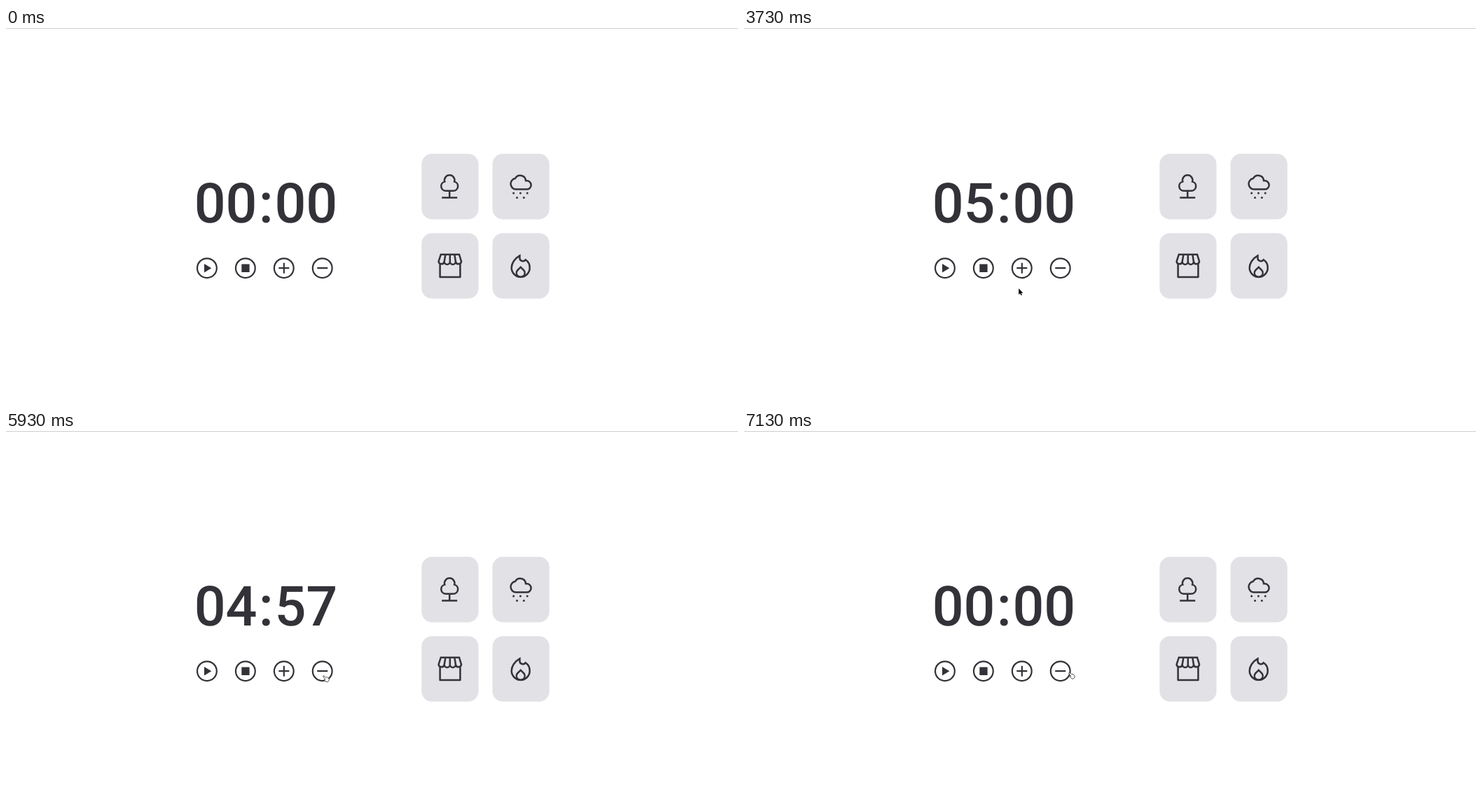
Write an HTML page that moves like this. It is 1045 px wide and 536 px high and loops after 8 s.

```html
<!DOCTYPE html>
<html lang="pt">
<head>
<meta charset="utf-8">
<title>Timer</title>
<style>
  html, body { margin: 0; width: 100%; height: 100%; overflow: hidden; background: #fff; }
  svg { display: block; text-rendering: geometricPrecision; }
  .clock { font: 500 79px Roboto, sans-serif; text-anchor: middle; fill: #323238; }
  .line { fill: none; stroke: #323238; stroke-width: 2.5; }
  .ring { fill: none; stroke: #323238; stroke-width: 2.2; }
  .ink { fill: #323238; }
  .card { fill: #e1e1e6; }
  #dialog text { font: 9.15px "DejaVu Sans Mono", monospace; fill: #15141a; }
  #dialog .bold { font-weight: 700; }
  #dialog .mid { text-anchor: middle; }
</style>
</head>
<body>
<svg width="1045" height="536" viewBox="0 0 1045 536">
  <g class="clock">
    <text id="min" x="313.6" y="278"></text>
    <text x="371.2" y="278">:</text>
    <text id="sec" x="428.3" y="278"></text>
  </g>

  <g id="rings"></g>
  <path class="ink" d="M283 337l10.3 6.2-10.3 6.2zM336.3 337.6h11.3v11.3h-11.3z"/>
  <path class="ring" d="M389.3 343.2h15M396.8 335.7v15M444.2 343.2h15"/>

  <g id="cards"></g>
  <g class="line">
    <!-- tree -->
    <path d="M638.4 232.8H628A6.7 6.7 0 0 1 626.3 219.6A7.2 7.2 0 1 1 640.1 219.6A6.7 6.7 0 0 1 638.4 232.8zM633.2 233v9.5M622.2 242.5h22"/>
    <!-- cloud -->
    <path d="M727.4 230.6H743.4a6.2 6.2 0 0 0 0-12.4H742A8 8 0 0 0 727 215A7.9 7.9 0 0 0 727.4 230.6z"/>
    <!-- shop -->
    <path d="M620.8 323.7h26.2l3 10a4.1 4.3 0 0 1-8.1 0a4.05 4.3 0 0 1-8.1 0a4.05 4.3 0 0 1-8.1 0a4.1 4.3 0 0 1-8.1 0zM627.4 323.7l-1.7 10M633.8 323.7v10M640.3 323.7l1.6 10"/>
    <path d="M619.6 337.5v18.6h28.8v-18.6" stroke-linejoin="round"/>
    <!-- flame -->
    <path d="M733.4 325.3C726 329.5 721.7 336.5 721.7 342.8A13 13 0 0 0 747.7 342.8C747.7 337.5 745 333.3 741.7 331.2C739.5 334.5 733.4 333.5 733.4 329z"/>
    <path d="M734.7 341.8l-4.6 4.6a5.9 5.9 0 1 0 9.2 0z"/>
  </g>
  <g id="drops" class="ink"></g>

  <g id="dialog">
    <rect width="1045" height="536" fill="#1c1b22" fill-opacity=".45"/>
    <rect x="366.6" y="204.7" width="311.8" height="157.4" rx="5.5" fill="#fff" style="filter:drop-shadow(0 1px 3px #0004)"/>
    <g fill="none" stroke="#15141a" stroke-width=".9">
      <circle cx="382" cy="220" r="4.5"/>
      <ellipse cx="382" cy="220" rx="2" ry="4.5"/>
      <path d="M377.8 218.4h8.4M377.8 221.6h8.4"/>
    </g>
    <text class="bold" x="389.3" y="223.4">127.0.0.1:5501</text>
    <text x="376.4" y="246.2">O botão de remover minutos funciona somente acima de</text>
    <text x="376.4" y="257.4">5 minutos. Sendo assim deseja zerar a contagem?</text>
    <text x="420.6" y="268.6">1 - Sim</text>
    <text x="420.6" y="279.8">2 - Não</text>
    <rect x="376.8" y="295.9" width="291.4" height="22.4" rx="2.8" fill="#fff" stroke="#0061e0" stroke-width="1.4"/>
    <text id="answer" x="382.3" y="310.3"></text>
    <rect id="caret" y="301.3" width=".9" height="11.4" fill="#15141a"/>
    <rect x="579" y="331" width="52.5" height="21" rx="2.8" fill="#f0f0f2"/>
    <rect x="636.7" y="330.8" width="31.4" height="21.3" rx="2.8" fill="#0061e0"/>
    <text class="bold mid" x="605.2" y="344.6">Cancel</text>
    <text class="bold mid" x="652.3" y="344.6" style="fill:#fff">OK</text>
  </g>
  <rect width="1045" height="1" fill="#cfcfd1"/>

  <g id="cursor">
    <path id="arrow" d="M0 0V8.6L2 6.9L3.4 9.8L4.8 9.2L3.4 6.4H6.1z" stroke="#fff" stroke-width=".8" paint-order="stroke"/>
    <path id="hand" d="M.5 1.5Q1 .3 2 1L4.6 3.2L6 2.6L9.3 5.5L9 7.8L6.8 9.8L4.8 9.3L2.3 7Q2 5.9 3.2 6L3.8 6.2z" fill="#fff" stroke="#222" stroke-width=".8"/>
  </g>
</svg>
<script>
const $ = id => document.getElementById(id);
const show = (id, on) => $(id).style.display = on ? '' : 'none';
const clamp = (v, lo, hi) => Math.min(Math.max(v, lo), hi);
const repeat = (id, n, shape) => $(id).innerHTML = Array.from({ length: n }, (_, i) => shape(i)).join('');

const LOOP = 8000, STEP = 1000 / 15;
const ADD = 1670, COUNT = 2930, ASK = 6270, TYPE = 6870, RESET = 7130;
const buttonX = i => 286.9 + i * 54.93, buttonY = 343.2;

repeat('rings', 4, i => `<circle class="ring" cx="${buttonX(i)}" cy="${buttonY}" r="13.9"/>`);
repeat('cards', 4, i => `<rect class="card" x="${593.3 + i % 2 * 101.2}" y="${179.8 + (i >> 1) * 113.4}" width="81.2" height="93.6" rx="15"/>`);
repeat('drops', 5, i => `<circle cx="${724.6 + i * 4.9}" cy="${236 + i % 2 * 6.5}" r="1.5"/>`);

// pointer trips: each eases to a stop, bowed up or down on the way
const entry = { x: 540, y: 488 };
const trips = [
  { from: 533, to: 1000, x: 389, y: 331, bow: 0 },
  { from: 1800, to: 2533, x: 282, y: 338, bow: -12 },
  { from: 3133, to: 4600, x: 451, y: 358, bow: 24 },
  { from: 4867, to: 5200, x: 452, y: 349, bow: 0 },
  { from: 6400, to: 6467, x: 463, y: 344.5, bow: 0 }
];

function pointerAt(t) {
  return trips.reduce((p, trip) => {
    const u = clamp((t - trip.from) / (trip.to - trip.from), 0, 1);
    const k = 1 - (1 - u) ** 2;
    return {
      x: p.x + (trip.x - p.x) * k,
      y: p.y + (trip.y - p.y) * k + trip.bow * Math.sin(Math.PI * k)
    };
  }, entry);
}

function secondsLeft(t) {
  if (t < ADD || t >= RESET) return 0;
  return 300 - Math.floor(clamp(t - COUNT, 0, ASK - COUNT) / 1000);
}

function draw(t) {
  const left = secondsLeft(t), two = n => String(n).padStart(2, '0');
  $('min').textContent = two(Math.floor(left / 60));
  $('sec').textContent = two(left % 60);

  const asking = t >= ASK && t < RESET, typed = t >= TYPE;
  show('dialog', asking);
  $('answer').textContent = typed ? '1' : '';
  $('caret').setAttribute('x', typed ? 387.3 : 382.2);

  // the pointer moves at 15 steps per second
  const { x, y } = pointerAt(Math.floor((t + 4) / STEP) * STEP + 1);
  const near = d => Math.abs(d) < 14.3;
  const hover = !asking && near(y - buttonY) && [0, 1, 2, 3].some(i => near(x - buttonX(i)));
  show('cursor', t >= 530);
  show('hand', hover);
  show('arrow', !hover);
  $('cursor').setAttribute('transform', `translate(${x} ${y})`);
}

const start = performance.now();
function frame() {
  draw((performance.now() - start) % LOOP);
  requestAnimationFrame(frame);
}
frame();
</script>
</body>
</html>
```
